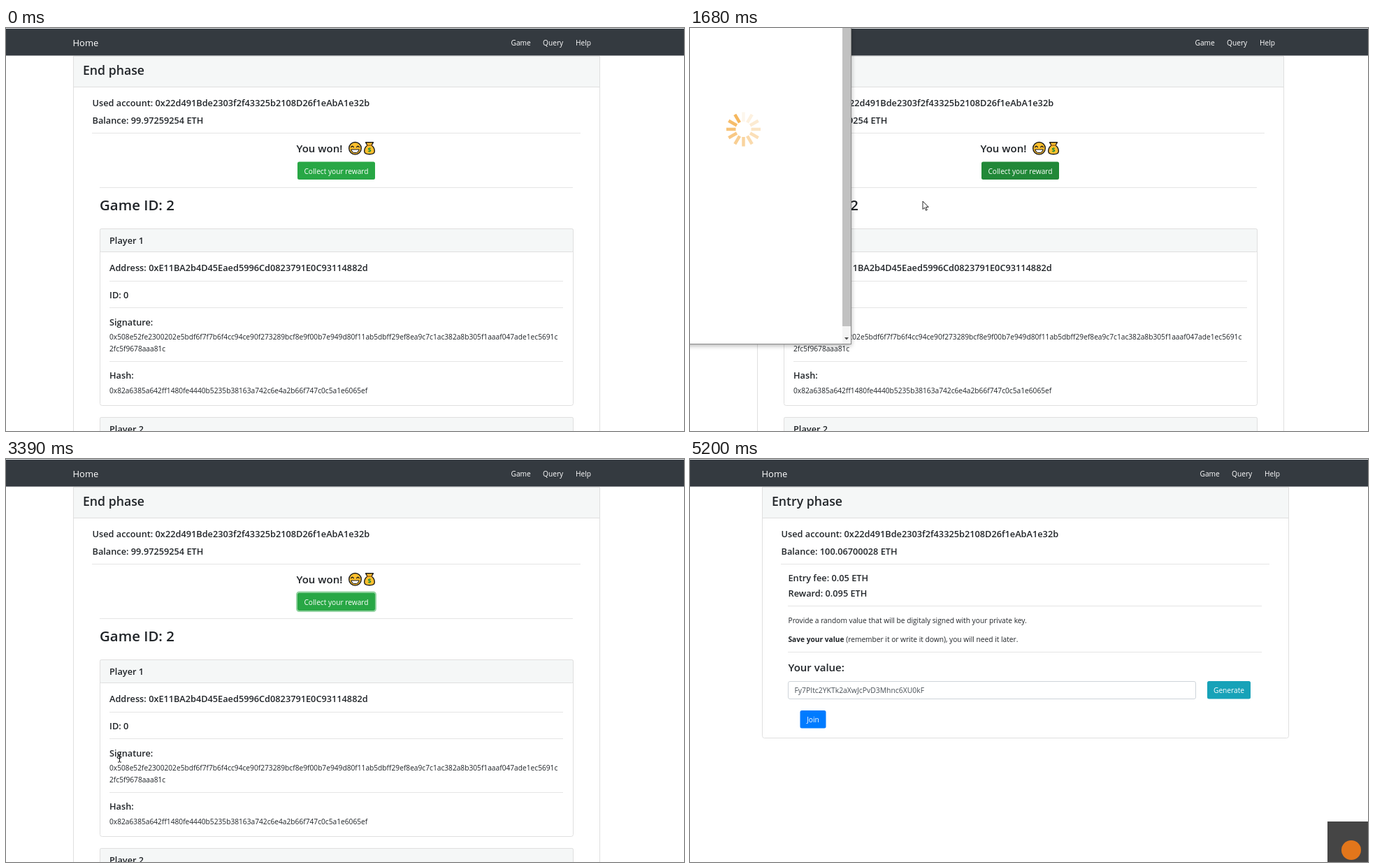
An HTML page for the animation above (6580 ms loop, 970 by 577 pixels).

```html
<!DOCTYPE html>
<html lang="en">
<head>
<meta charset="utf-8">
<title>End phase</title>
<style>
html, body { margin: 0; width: 100%; height: 100%; overflow: hidden; background: #fff; }
svg { display: block; width: 970px; height: 577px; }
text { font: 10.2px "Open Sans", "Noto Sans", sans-serif; fill: #212529; white-space: pre; }
.h { font-weight: 600; font-size: 12.75px; }
.h4 { font-weight: 600; font-size: 15px; }
.h3 { font-weight: 600; font-size: 17.7px; }
.h2 { font-weight: 600; font-size: 20.4px; }
.w { fill: #fff; }
.mid { text-anchor: middle; }
.end { text-anchor: end; }
.brand { font-size: 13px; }
.value { font-size: 10.4px; fill: #495057; }
.rule { stroke: #e5e5e5; }
.box { fill: #fff; stroke: #dfdfdf; }
.head { fill: #f5f7f7; stroke: #dfdfdf; }
#popup text { font-family: Roboto, sans-serif; }
#popup .num { font-size: 20.5px; }
#popup .note { font-size: 13.8px; fill: #9b9b9b; }
#popup .tiny { font-size: 8.6px; fill: #8c8e94; }
#popup .lab { font-size: 9.6px; fill: #8c8e94; }
#popup .acc { font-size: 12.2px; fill: #5b5d67; }
#popup .btn { font-size: 12px; }
</style>
</head>
<body>
<svg id="stage" viewBox="0 0 970 577" xmlns="http://www.w3.org/2000/svg"></svg>
<script>
const LOOP = 6580;
const text = (x, y, s, cls = '') => `<text x="${x}" y="${y}" class="${cls}">${s}</text>`;
const rect = (x, y, w, h, attrs, r = 0) =>
  `<rect x="${x}" y="${y}" width="${w}" height="${h}" rx="${r}" ${attrs}/>`;
const rule = (x1, x2, y) => `<path class="rule" d="M${x1} ${y}.5H${x2}"/>`;
const button = (x, y, w, fill, label, id = '') =>
  rect(x, y, w, 25.5, `fill="${fill}" id="${id}"`, 2.5) + text(x + w / 2, y + 17, label, 'w mid');

function header(x, title) {
  return rect(x + .5, 40.5, 753, 44, 'class="head"') + text(x + 14, 67, title, 'h3');
}
function nav(x) {
  return rect(0, 0, 970, 1, 'fill="#e3e6e8"') + rect(0, 1, 970, 38.5, 'fill="#343a40"') +
    text(x, 25.5, 'Home', 'w brand') + text(x + 627, 24.5, 'Game', 'w') +
    text(x + 672.5, 24.5, 'Query', 'w') + text(x + 719.5, 24.5, 'Help', 'w');
}
function player(y, n) {
  return rect(134.5, y + .5, 677, 253, 'class="box"', 3) + rect(134.5, y + .5, 677, 33, 'class="head"', 2) +
    text(148, y + 22, 'Player ' + n, 'h');
}

const emoji = `
  <g stroke="#1b1b1b" stroke-width="1.4" stroke-linecap="round" stroke-linejoin="round">
    <circle cx="499.5" cy="172.3" r="8.8" fill="#ffc02e"/>
    <path d="M493.7 170.6q1.8-2.6 3.6 0M501.7 170.6q1.8-2.6 3.6 0" fill="none"/>
    <path d="M493.8 174h11.4q-.9 4.6-5.7 4.6t-5.7-4.6z" fill="#fff" stroke-width="1.1"/>
    <path d="M517 168l-2.4-4.2h10.8l-2.4 4.2c3 2.4 4.5 5.600 4.300 8.800-.2 3-2.700 4-7.300 4s-7.100-1-7.300-4c-.2-3.200 1.300-6.400 4.300-8.800z" fill="#ffc02e"/>
    <path d="M516.800 168h6.400" stroke="#a8661a"/>
  </g>
  <text x="520" y="178" class="mid" style="font-weight:700;font-size:9px;fill:#138a3c">$</text>`;

const endPage = `<g id="endPage">
  ${rect(96.5, 40.5, 753, 560, 'class="box"')}${header(96, 'End phase')}${nav(95.5)}
  ${text(123.500, 112, 'Used account: 0x22d491Bde2303f2f43325b2108D26f1eAbA1e32b', 'h')}
  ${text(123.500, 136.500, 'Balance: 99.97259254 ETH', 'h')}${rule(123, 822, 150)}
  ${text(415.500, 178, 'You won!', 'h4')}${emoji}
  ${rect(416, 190.500, 113, 27.500, 'id="ring" fill="none" stroke="#94d3a2" stroke-width="2"', 3.5)}
  ${button(417, 191.500, 111, '#28a745', 'Collect your reward', 'collect')}
  ${rule(134, 811, 228)}${text(134, 261, 'Game ID: 2', 'h2')}
  ${player(287, 1)}
  ${text(148, 348, 'Address: 0xE11BA2b4D45Eaed5996Cd0823791E0C93114882d', 'h')}${rule(148, 797, 362)}
  ${text(148, 387, 'ID: 0', 'h')}${rule(148, 797, 400)}
  ${text(148, 425.500, 'Signature:', 'h')}
  ${text(148, 446, '0x508e52fe2300202e5bdf6f7f7b6f4cc94ce90f273289bcf8e9f00b7e949d80f11ab5dbff29ef8ea9c7c1ac382a8b305f1aaaf047ade1ec5691c')}
  ${text(148, 462.500, '2fc5f9678aaa81c')}${rule(148, 797, 477)}
  ${text(148, 502, 'Hash:', 'h')}
  ${text(148, 523, '0x82a6385a642ff1480fe4440b5235b38163a742c6e4a2b66f747c0c5a1e6065ef')}
  ${player(557, 2)}</g>`;

const entryPage = `<g id="entryPage">
  ${rect(103.5, 40.5, 753, 359, 'class="box"', 3)}${header(103, 'Entry phase')}${nav(102.5)}
  ${text(130.500, 112, 'Used account: 0x22d491Bde2303f2f43325b2108D26f1eAbA1e32b', 'h')}
  ${text(130.500, 136.500, 'Balance: 100.06700028 ETH', 'h')}${rule(130, 829, 150)}
  <text x="140.5" y="175" class="h" id="fee"></text><text x="140.5" y="197" class="h" id="reward"></text>
  ${rule(140, 818, 210)}
  ${text(140.500, 234.500, 'Provide a random value that will be digitaly signed with your private key.')}
  ${text(140.500, 261.500, '<tspan font-weight="700">Save your value</tspan> (remember it or write it down), you will need it later.')}
  ${rule(140, 818, 276)}${text(140.500, 304, 'Your value:', 'h4')}
  ${rect(140.5, 318.500, 583, 25, 'fill="#fff" stroke="#ced4da"', 2.5)}
  ${text(149.500, 335, 'Fy7PItc2YKTk2aXwJcPvD3Mhnc6XU0kF', 'value')}
  ${button(740, 318, 62, '#17a2b8', 'Generate')}${button(157.500, 360, 37, '#007bff', 'Join')}</g>`;

const amount = (y, fill) => `<circle cx="117" cy="${y - 7}" r="4.5" fill="#5c5c5c"/>
  <text x="211" y="${y}" class="num end" style="fill:${fill}">0.001338</text>` +
  text(211, y + 20, 'No Conversion Rate Available', 'note end');

const ticks = Array.from({ length: 12 }, (_, i) =>
  `<path class="tick" d="M0-11V-24.500" transform="rotate(${i * 30})"/>`).join('');

const popup = `<g id="popup">
  <g filter="url(#shadow)">${rect(-120, -60, 350.500, 512.500, 'fill="#fff" stroke="#8a8a8a"')}</g>
  <g id="form">
    ${text(38, 7, 'Account 5', 'acc end')}
    <circle cx="84" cy="3" r="13" fill="#fff" stroke="#d8d8d8"/>
    <path d="M78 3h11m-4-4l4 4-4 4" fill="none" stroke="#5b5d67" stroke-width="1.400"/>
    <circle cx="120" cy="3" r="10.500" fill="#f5a33c"/><path d="M120-7.500a10.500 10.500 0 0 1 6 19z" fill="#c8325c"/>
    ${text(142, 7, '0xe78A...a8...', 'acc')}${rule(0, 218, 20)}
    ${rect(-40, 34.500, 131.500, 19.500, 'fill="none" stroke="#b5b7bb"', 3)}
    ${text(84, 48, 'CONTRACT INTERACTION', 'lab end')}
    ${text(22, 150, 'DATA', 'lab')}${rule(0, 211, 162)}
    <text x="211" y="185.500" class="lab end" style="fill:#2f9ae0">EDIT</text>
    ${amount(214, '#303030')}${rule(0, 211, 250)}
    ${text(211, 270.500, 'AMOUNT + GAS FEE', 'tiny end')}${amount(299, '#2f9ae0')}
    ${rule(0, 218, 391)}
    ${rect(-50, 406.500, 127, 44, 'fill="#dcdcdc" stroke="#9b9b9b"', 4)}${text(31, 433, 'Reject', 'btn end')}
    ${rect(91, 406, 127, 45, 'fill="#2f9ae0"', 4)}${text(154.500, 433, 'Confirm', 'btn mid w')}
  </g>
  <rect id="veil" width="218" height="452" fill="#fff" opacity=".86"/>
  <g id="spin" transform="translate(76.500 145)" stroke="#f5b04d" stroke-width="4.500">${ticks}</g>
  <g id="bar">${rect(218, 0, 12, 452, 'fill="#f4f4f4"')}${rect(218, 0, 12, 427, 'fill="#c1c1c1"')}
    <path d="M221 443h6l-3 3.500z" fill="#505050"/></g></g>`;

const cursor = `<g id="cursor" stroke="#111" stroke-linejoin="round">
  <path id="arrow" d="M0 0V11.500L2.700 9.100 4.500 13.200 6.300 12.400 4.600 8.400H8.200z" fill="#fff" stroke-width=".9"/>
  <path id="hand" d="M-1.200 1Q0-.8 1.200 1V5.400Q2.600 4.600 3.200 5.800 4.600 5.200 5.200 6.400 6.900 6 6.900 7.800V10.500Q6.800 12.500 5.600 13.200V15H-.6V13.500L-3.800 9.300Q-3.800 7.600-2.200 8.200L-1.200 9.200z" fill="#fff" stroke-width=".9"/>
  <path id="beam" d="M-2.500-5.500H-.6L0-5 .6-5.500H2.500M0-5V5M-2.500 5.500H-.6L0 5 .6 5.500H2.500" fill="none" stroke-width="1"/></g>`;

const toast = `<g id="toast">${rect(0, 519, 80, 60, 'fill="#454545"')}<circle cx="34" cy="560" r="14" fill="#e2761b"/></g>`;

document.getElementById('stage').innerHTML = `<defs><filter id="shadow" x="-10%" y="-10%" width="120%" height="120%">
  <feDropShadow dx="0" dy="2" stdDeviation="3" flood-opacity=".3"/></filter></defs>
  ${rect(0, 0, 970, 577, 'fill="#fff"')}${endPage}${entryPage}${popup}${toast}${cursor}`;

const $ = id => document.getElementById(id);
const show = (id, on) => $(id).setAttribute('display', on ? 'inline' : 'none');
const clamp = v => Math.min(1, Math.max(0, v));
const within = (t, a, b) => t >= a && t < b;

// Bursts of motion: start, end, number of pictures
const bursts = [[270, 890, 9], [990, 1600, 9], [1680, 2300, 9], [2460, 2460, 2],
  [2920, 3560, 9], [3620, 4260, 9], [4350, 4960, 9], [5050, 5200, 3]];

function snap(t) {
  const b = bursts.filter(s => t >= s[0]).pop();
  if (!b) return 0;
  const [from, to, n] = b, step = (to - from) / (n - 1);
  return from + Math.min(n - 1, Math.floor((t - from + 12) / step)) * step;
}

const smooth = u => u * u * (3 - 2 * u);
const slow = u => 1 - (1 - u) ** 2;
// Pointer path: time, x, y, easing to the next point
const path = [[270, 821, 536, smooth], [890, 474, 215], [1066, 475, 205], [1371, 475, 205],
  [1680, 333, 248, slow], [2300, 156, 428], [2460, 156, 429], [2920, 156, 428], [3320, 156, 428],
  [3400, 162.5, 428.5], [3560, 195, 430], [4100, 395, 433.5], [4260, 464, 454],
  [4960, 875, 562], [5050, 905, 567], [5125, 950, 570], [5200, 970, 577]];

function pointer(t) {
  const i = path.findIndex(k => k[0] > t);
  if (i < 1) return path[i < 0 ? path.length - 1 : 0].slice(1, 3);
  const [t0, x0, y0, ease = u => u] = path[i - 1], [t1, x1, y1] = path[i];
  const u = ease((t - t0) / (t1 - t0));
  return [x0 + (x1 - x0) * u, y0 + (y1 - y0) * u];
}

const tickEls = [...document.querySelectorAll('.tick')];

function drawPopup(t) {
  const p = clamp((t - 1270) / 150) * (1 - clamp((t - 3200) / 100));
  show('popup', p > 0);
  $('popup').setAttribute('opacity', p);
  $('popup').setAttribute('transform', `scale(${.965 + .035 * p})`);
  const filled = t >= 2050, busy = t >= 2920;
  show('bar', t >= 1590);
  show('form', filled);
  show('veil', busy);
  show('spin', within(t, 1590, 2050) || busy);
  const turn = Math.max(0, Math.floor((t - (busy ? 2920 : 1680)) / 83));
  tickEls.forEach((el, i) => el.setAttribute('opacity', .1 + .8 * ((i - turn + 120) % 12) / 11));
}

function draw(time) {
  const t = snap(time);
  const entry = t >= 3560, ready = t >= 3620;
  show('endPage', !entry);
  show('entryPage', entry);
  $('fee').textContent = `Entry fee: ${ready ? '0.05 ' : ''}ETH`;
  $('reward').textContent = `Reward: ${ready ? '0.095 ' : ''}ETH`;
  $('collect').setAttribute('fill', within(t, 1060, 1750) ? '#218838' : '#28a745');
  show('ring', within(t, 1140, 1440) || within(t, 3310, 3560));
  drawPopup(t);

  show('toast', t >= 3690);
  $('toast').setAttribute('transform', `translate(${912 + 58 * (1 - clamp((t - 3690) / 570)) ** 2.7})`);

  const hand = within(t, 1060, 1440) || within(t, 2220, 2920), beam = within(t, 3310, 3470);
  show('cursor', within(t, 270, 5200));
  show('hand', hand);
  show('beam', beam);
  show('arrow', !hand && !beam);
  $('cursor').setAttribute('transform', `translate(${pointer(t)})`);
}

const start = performance.now();
function loop() {
  draw((performance.now() - start) % LOOP);
  requestAnimationFrame(loop);
}
loop();
</script>
</body>
</html>
```
